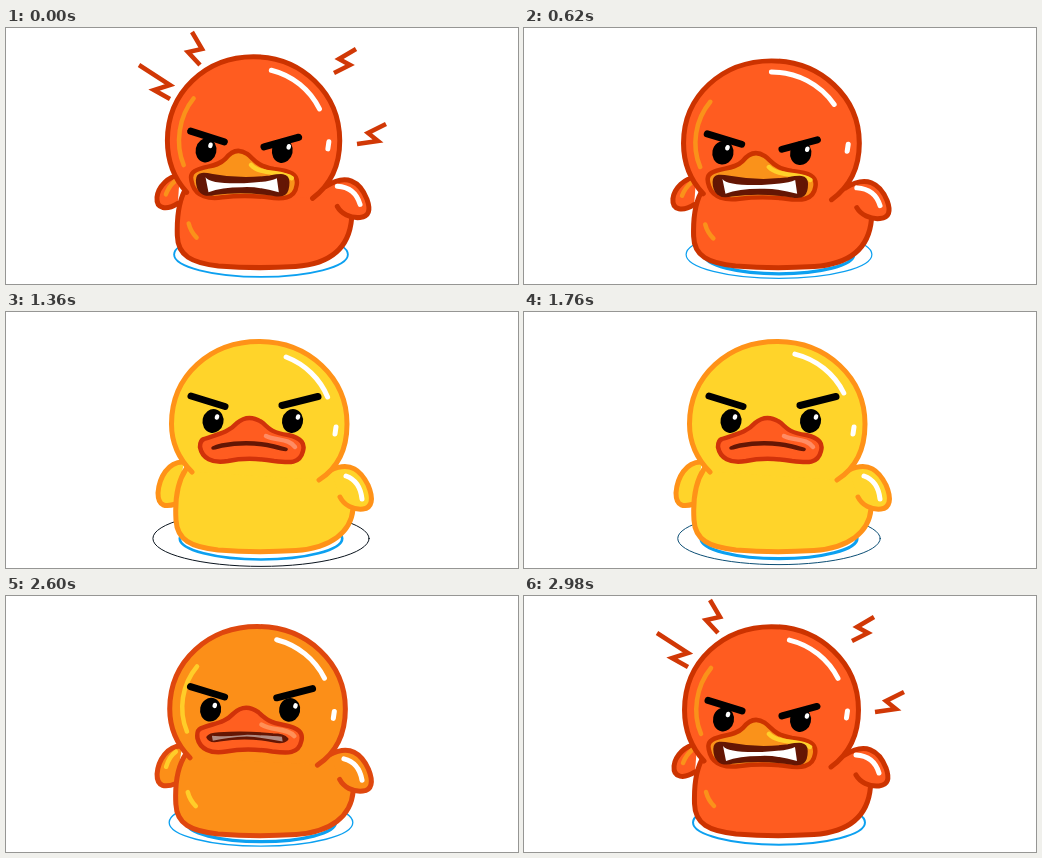
Write an HTML page that moves like this. It is 512x256 px and loops after 3000 ms.

```html
<!DOCTYPE html>
<html lang="en">
<head>
<meta charset="utf-8">
<title>Angry duck</title>
<style>
html, body { margin: 0; width: 100%; height: 100%; overflow: hidden; background: #fff; }
svg { display: block; width: 512px; height: 256px; fill: none; stroke-linecap: round; stroke-linejoin: round; }
#bolts path { stroke: #d13806; stroke-width: 4.5; stroke-linecap: butt; stroke-linejoin: miter; }
.shell { stroke-width: 5; }
.glow { stroke-width: 4.5; }
.shine { stroke: #fff; stroke-width: 5; }
.brow { stroke: #000; stroke-width: 7; }
</style>
</head>
<body>
<svg id="stage" viewBox="0 0 512 256">
  <g id="rings"></g>
  <g id="duck"></g>
  <g id="bolts"></g>
</svg>
<script>
const LOOP = 3000;
const byId = id => document.getElementById(id);
const clamp = x => Math.min(1, Math.max(0, x));
const ramp = (t, from, to) => clamp((t - from) / (to - from));
const smooth = x => x * x * (3 - 2 * x);
const lerp = (a, b, k) => a + (b - a) * k;

// Interpolates two path strings that share the same commands.
function morph(calm, angry, k) {
  const ends = angry.match(/-?[\d.]+/g);
  let i = 0;
  return calm.replace(/-?[\d.]+/g, n => lerp(+n, +ends[i++], k).toFixed(2));
}

// Runs through evenly spaced colours.
function shade(stops, k) {
  const x = clamp(k) * (stops.length - 1);
  const i = Math.min(stops.length - 2, Math.floor(x));
  return `rgb(${stops[i].map((v, n) => Math.round(lerp(v, stops[i + 1][n], x - i)))})`;
}

function set(node, attrs) {
  for (const key in attrs) node.setAttribute(key, attrs[key]);
}
function add(parent, tag, attrs) {
  const node = document.createElementNS('http://www.w3.org/2000/svg', tag);
  set(node, attrs);
  return parent.appendChild(node);
}

const SKIN = [[255, 212, 42], [252, 146, 24], [255, 92, 32]];
const EDGE = [[255, 146, 24], [224, 72, 15], [204, 51, 0]];
const GLOW = [[255, 212, 42], [255, 208, 42], [250, 146, 26]];
const BILL = [[255, 92, 32], [255, 92, 32], [250, 146, 26]];
const BILL_EDGE = [[208, 50, 10], [208, 50, 10], [204, 51, 0]];
const BILL_SHINE = [[255, 140, 100], [255, 140, 90], [255, 208, 42]];
const BLUE_TO_BLACK = [[12, 160, 240], [10, 20, 30]];

const duck = byId('duck');
const parts = [];
function part(calm, angry, cls, paint) {
  parts.push({ node: add(duck, 'path', { class: cls }), calm, angry, paint });
}
const shell = c => ({ fill: shade(SKIN, c), stroke: shade(EDGE, c) });
const skinOnly = c => ({ fill: shade(SKIN, c) });
const edgeOnly = c => ({ stroke: shade(EDGE, c) });
const glow = c => ({ stroke: shade(GLOW, c), opacity: clamp(c * 2) });
const plain = () => ({});

const BODY = 'M180 157 C170 172 169 192 170 208 C171 228 185 235 212 238 Q250 241 290 238.5 C325 236 345 220 347 197';
const BODY_ANGRY = 'M180 160 C172 172 170 192 170.5 208 C171 228 185 235 212 238 Q250 241 290 238.5 C325 236 344 220 346.5 191';
const HEAD = 'M186 160 C173 147 165.5 131 165.5 112 C165.5 63 205 29.5 253 29.5 C303 29.5 341 66 341 112 C341 137 332 156 313 168';
const HEAD_ANGRY = 'M180 165 C167 151 160.5 133 160.5 114 C160.5 66 199 30.7 247.5 30.7 C296 30.7 334.5 67 334.5 114 C334.5 138 325 158 307 171';

part('M178 150 C162 149 153 166 152 181 C152 195 160 195 170 192',
     'M173 149 C162 148 151 160 150 170 C149 182 160 183 171 176', 'shell', shell);
part('M161 172 Q164 161 171 156', 'M159 167 Q162 159 168 154', 'glow', glow);
part(BODY + ' L335 160 Z', BODY_ANGRY + ' L333 160 Z', '', skinOnly);
part(BODY, BODY_ANGRY, 'shell', edgeOnly);
part('M325 158 C345 149 355 159 362 173 C368 187 366 196 357 197 C347 198 338 193 334 185',
     'M321 159 C341 146 355 154 362 172 C366 183 364 189 355 190 C345 191 336 186 332 179', 'shell', shell);
part('M340 164 Q354 169 356 187', 'M332 159 Q350 160 355 177', 'shine', plain);
part(HEAD + ' Z', HEAD_ANGRY + ' Z', '', skinOnly);
part(HEAD, HEAD_ANGRY, 'shell', edgeOnly);
part('M193 69 C178 87 174 112 183 134', 'M187 72 C172 90 168 117 177 138', 'glow', glow);
part('M182 196 Q184 204 190 210', 'M182 196 Q184 204 190 210', 'glow', glow);
part('M330 115 L329 122', 'M323.5 115 L322.5 122', 'shine', plain);
const arc = add(duck, 'path', { class: 'shine' });

// Eyes: calm and angry centres of the pupil and its spark.
const eyes = [
  { calm: [207, 109, 211, 105], angry: [199.5, 123.5, 204, 118.5] },
  { calm: [286.5, 109, 292, 105], angry: [276.5, 124, 283, 120] }
].map(eye => ({
  ...eye,
  pupil: add(duck, 'ellipse', { rx: 10.5, ry: 12, fill: '#000' }),
  spark: add(duck, 'ellipse', { rx: 2.2, ry: 2.8, fill: '#fff' })
}));
part('M185 84 L219 94.5', 'M184 104.5 L218 115', 'brow', plain);
part('M276 93.5 L312 84.5', 'M258 120 L293 110.5', 'brow', plain);

// Bill, its shine, mouth and teeth.
part('M198 127 C212 122 222 121 231 111 Q243 101 257 111 C264 118 268 121 282 123 C296 126 299 132 297 139 C294 152 284 151 268 149 C250 146 236 146 222 149 C206 152 196 146 194 135 C194 130 195 128 198 127 Z',
     'M188 144 C198 138 210 141 219 132 Q229 119 241 127 C248 132 250 139 268 142 C285 144 293 147 291 158 C289 172 276 172 262 170 C245 168 232 168 216 170 C202 172 190 169 186 158 C184 152 183 147 188 144 Z',
     '', c => ({ fill: shade(BILL, c), stroke: shade(BILL_EDGE, c), 'stroke-width': 4.5 }));
part('M260 124 C270 129 283 126 289 135', 'M245 138 C254 148 277 144 286 151',
     'glow', c => ({ stroke: shade(BILL_SHINE, c) }));
part('M207 136 C209 135 212 134 216 133 Q243 128 268 134 C272 135 276 136 280 137.5 C276 137 272 136 268 135 Q243 129 216 134 C212 135 209 136 207 136 Z',
     'M191 153 C191 146 198 147 206 148.5 Q235 154 264 150 C275 148 282 147 282 155 C282 166 278 169 268 167 Q237 162 208 166 C196 169 191 163 191 153 Z',
     '', c => ({ fill: '#641604', stroke: '#641604', 'stroke-width': 3.5 }));
part('M209 135 Q216 134 243 131 Q266 133 278 136 L278 137 Q262 134 243 132 Q224 133 209 136 Z',
     'M199 150 Q204 157 238 156 Q263 155 271 151 L273 165 Q252 159 236 160 Q215 160 202 165 Z',
     '', (c, a) => ({ fill: '#fff', opacity: clamp(a * 1.7) }));

const bolts = [
  'M133 37 L164 57 L148 62 L164 71',
  'M186 4 L196 21 L182 24 L194 37',
  'M350 21 L333 31 L344 37 L328 45',
  'M380 96 L362 105 L372 113 L351 116'
].map(d => add(byId('bolts'), 'path', { d, pathLength: 100 }));
const rings = [0, 1].map(() => add(byId('rings'), 'ellipse', { cx: 255, cy: 226.5 }));

// Time, start angle and end angle of the moving shine on the head.
const SHINE = [[0, -76, -26], [620, -90, -33], [1360, -68.5, -22], [1760, -76, -25.5], [2260, -74, -25], [3000, -76, -26]];

// A new ring leaves the duck every 500 ms and thins out as it widens.
function drawRings(t) {
  rings.forEach((ring, i) => {
    const age = (t + 440) % 500 - 200 + i * 500;
    const radius = 78 + 0.028 * age + 3.67e-5 * age * age;
    set(ring, {
      rx: radius,
      ry: 0.258 * radius,
      stroke: shade(BLUE_TO_BLACK, ramp(age, 360, 600)),
      'stroke-width': lerp(3.2, 1, ramp(age, 0, 400)),
      visibility: age < 680 ? 'visible' : 'hidden'
    });
  });
}

// Each strike grows from its outer end, holds, then runs out inwards.
function drawBolts(t) {
  const start = t < 200 ? 2780 - LOOP : t < 2780 ? 2220 : 2780;
  const head = 100 * ramp(t - start, 0, 180);
  const tail = 100 * ramp(t - start, 240, 360);
  bolts.forEach(bolt => set(bolt, {
    'stroke-dasharray': `${head - tail} 300`,
    'stroke-dashoffset': -tail,
    visibility: head > tail ? 'visible' : 'hidden'
  }));
}

function drawShine(t, anger) {
  const i = SHINE.findIndex((key, n) => t < SHINE[n + 1][0]);
  const [from, to] = [SHINE[i], SHINE[i + 1]];
  const k = smooth(ramp(t, from[0], to[0]));
  const cx = lerp(253, 247.5, anger), cy = lerp(112, 114, anger);
  const point = n => {
    const angle = lerp(from[n], to[n], k) * Math.PI / 180;
    return `${cx + 74 * Math.cos(angle)} ${cy + 72 * Math.sin(angle)}`;
  };
  set(arc, { d: `M${point(1)} A74 72 0 0 1 ${point(2)}` });
}

function render(t) {
  const rise = ramp(t, 2200, 2960);
  const calming = 1 - smooth(ramp(t, 740, 1240));
  const anger = t < 2000 ? calming : smooth(rise ** 1.6);
  const heat = t < 2000 ? calming : rise;

  const wobble = anger * 0.014 * Math.sin(2 * Math.PI * 17 * t / LOOP + 0.7);
  set(duck, { transform: `translate(255 242) scale(${1 - wobble} ${1 + wobble}) translate(-255 -242)` });
  for (const p of parts) set(p.node, { d: morph(p.calm, p.angry, anger), ...p.paint(heat, anger) });
  for (const eye of eyes) {
    const [x, y, sx, sy] = eye.calm.map((v, i) => lerp(v, eye.angry[i], anger));
    set(eye.pupil, { cx: x, cy: y, transform: `rotate(12 ${x} ${y})` });
    set(eye.spark, { cx: sx, cy: sy, transform: `rotate(15 ${sx} ${sy})` });
  }
  drawShine(t, anger);
  drawRings(t);
  drawBolts(t);
}

const begin = performance.now();
function tick() {
  render((performance.now() - begin) % LOOP);
  requestAnimationFrame(tick);
}
tick();
</script>
</body>
</html>
```
